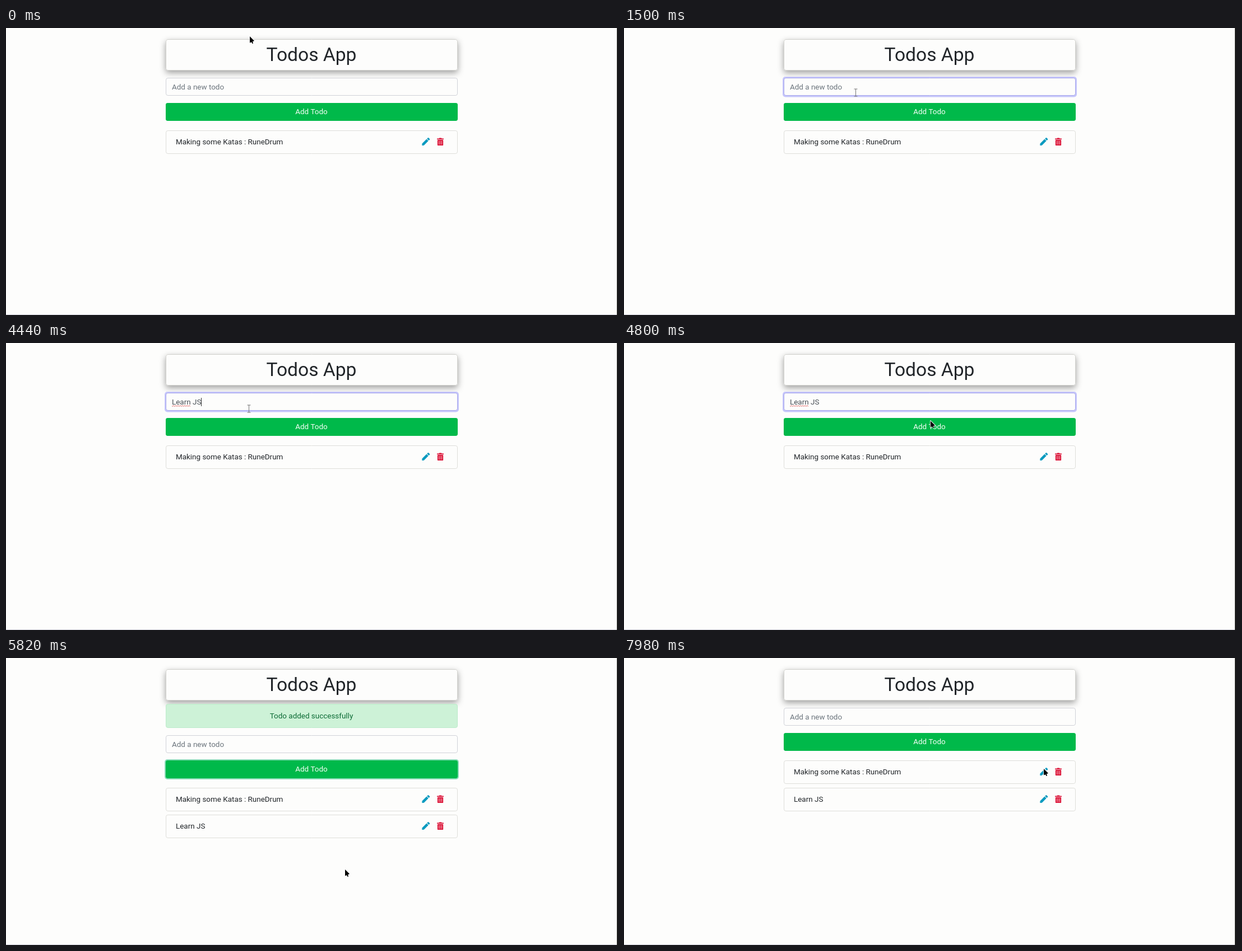
These frames come from a looping animation (1092x513 px, 8 s). An HTML page with a canvas:

```html
<!DOCTYPE html>
<html lang="en">
<head>
<meta charset="utf-8">
<title>Todos App</title>
<style>
  html, body { margin: 0; width: 100%; height: 100%; overflow: hidden; background: #fdfdfc; }
  canvas { display: block; width: 1092px; height: 513px; }
</style>
</head>
<body>
<canvas id="stage" width="1092" height="513"></canvas>
<script>
const ctx = document.getElementById('stage').getContext('2d');
const LOOP = 8000;
const LEFT = 285, WIDTH = 521, CENTER = 545, RADIUS = 3.4;
const PITCH = 48.7;
const PAPER = '#fdfdfc';
const FONT = 'Roboto, Arial, sans-serif';

const FOCUS = 1000, HOVER = 4790, BLUR = 4980, ADDED = 5280, ALERT_END = 6300;
const DRAFT = 'Learn JS', FIRST_WORD = 6;

// The pointer rests between these moves
const MOVES = [
  { from: 100, to: 180, x: 431, y: 20 },
  { from: 480, to: 960, x: 413.5, y: 115 },
  { from: 4430, to: 4440, x: 433.5, y: 117 },
  { from: 4560, to: 4960, x: 607.5, y: 151 },
  { from: 5340, to: 5820, x: 605, y: 378 },
  { from: 6180, to: 6780, x: 515.5, y: 382.5 },
  { from: 7020, to: 7440, x: 728, y: 238 },
  { from: 7680, to: 7960, x: 749, y: 198 }
];

const lerp = (a, b, k) => a + (b - a) * k;
const ease = v => v * v * (3 - 2 * v);
const ramp = (t, from, to = from + 150) =>
  ease(Math.max(0, Math.min(1, (t - from) / (to - from))));
const mix = (a, b, k) => `rgb(${a.map((v, i) => Math.round(lerp(v, b[i], k)))})`;

function pointerAt(t) {
  let x = 435, y = 15;
  for (const move of MOVES) {
    const k = ramp(t, move.from, move.to);
    x = lerp(x, move.x, k);
    y = lerp(y, move.y, k);
  }
  return { x, y };
}

// Steady typing, with a pause before the second word
const keyTime = i => i < FIRST_WORD ? 1800 + i * 264 : 3900 + (i - FIRST_WORD) * 120;

function typedCount(t) {
  let n = 0;
  while (n < DRAFT.length && keyTime(n) <= t) n++;
  return n;
}

function box(x, y, w, h, fill, stroke, r = RADIUS) {
  ctx.beginPath();
  ctx.roundRect(x, y, w, h, r);
  if (fill) { ctx.fillStyle = fill; ctx.fill(); }
  if (stroke) { ctx.strokeStyle = stroke; ctx.lineWidth = 1; ctx.stroke(); }
}

function frame(y, h, fill, stroke) {
  box(LEFT + .5, Math.round(y) + .5, WIDTH - 1, h, fill, stroke);
}

function halo(y, h, color, amount) {
  ctx.globalAlpha = amount;
  box(LEFT - 2, y - 2, WIDTH + 4, h + 4, color, null, 5);
  ctx.globalAlpha = 1;
}

function label(text, x, y, color, align = 'left', size = 13.44) {
  ctx.font = `${size}px ${FONT}`;
  ctx.textAlign = align;
  ctx.fillStyle = color;
  ctx.fillText(text, x, Math.round(y));
}

function header() {
  ctx.save();
  ctx.shadowColor = 'rgba(0,0,0,.38)';
  ctx.shadowBlur = 12;
  ctx.shadowOffsetY = 4.5;
  box(LEFT, 20, WIDTH, 55.5, PAPER);
  ctx.restore();
  frame(20, 55, PAPER, '#d2d2ce');
  label('Todos App', CENTER, 59, '#212529', 'center', 33.6);
}

function alertBar() {
  frame(82, 42, '#cdf2d7', '#bcebca');
  label('Todo added successfully', CENTER, 108, '#0c6b35', 'center');
}

function squiggle(x, y, w) {
  ctx.beginPath();
  for (let i = 0; i <= w; i++) ctx.lineTo(x + i, y + Math.sin(i * Math.PI / 2) * .8);
  ctx.strokeStyle = '#e06a6a';
  ctx.lineWidth = 1;
  ctx.stroke();
}

function caretOn(t, count) {
  const last = count ? keyTime(count - 1) : FOCUS;
  return t >= FOCUS && t < BLUR && (t - last) % 1000 < 500;
}

function input(t, dy) {
  const focus = ramp(t, FOCUS) * (1 - ramp(t, BLUR));
  const count = t < ADDED ? typedCount(t) : 0;
  const typed = DRAFT.slice(0, count);
  const y = 89 + dy;
  halo(y, 32.5, '#c6c6fb', focus);
  frame(y, 31, PAPER, mix([208, 210, 216], [166, 166, 235], focus));
  label(typed || 'Add a new todo', 296, 110 + dy, typed ? '#495057' : '#6c757d');
  if (count >= FIRST_WORD && t < BLUR) squiggle(296, 112.5, ctx.measureText('Learn').width);
  if (caretOn(t, count)) {
    ctx.fillStyle = '#333';
    ctx.fillRect(Math.round(296 + ctx.measureText(typed).width), 98, 1, 15);
  }
}

function button(t, dy) {
  const hover = ramp(t, HOVER) * (1 - ramp(t, ADDED));
  const y = Math.round(134 + dy);
  halo(y, 32, '#8bdcb9', ramp(t, 5060) * (1 - ramp(t, ALERT_END)));
  box(LEFT, y, WIDTH, 32, mix([0, 185, 74], [0, 150, 57], hover));
  label('Add Todo', CENTER, 154.4 + dy, '#f4fff7', 'center');
}

// Drawn along its length from the tip, then turned
function pencil(x, y) {
  const half = 2.3;
  ctx.save();
  ctx.translate(x, y);
  ctx.rotate(-Math.PI / 4);
  ctx.fillStyle = '#0a9abf';
  ctx.beginPath();
  ctx.lineTo(0, 0);
  ctx.lineTo(half, -half);
  ctx.lineTo(half, half);
  ctx.fill();
  ctx.fillRect(half, -half, 11.5, half * 2);
  box(14.8, -half, 3.2, half * 2, '#0a9abf', null, .8);
  ctx.restore();
}

function trash(x, y) {
  const red = '#dc1438';
  box(x + 3.6, y - .2, 4.8, 1.6, red, null, .7);
  box(x, y + .8, 12, 1.7, red, null, .5);
  box(x + .9, y + 3.3, 10.2, 10, red, null, 1.2);
  ctx.fillStyle = '#f6d3d8';
  for (let i = 0; i < 3; i++) ctx.fillRect(x + 3.1 + i * 2.5, y + 5, .8, 6.5);
}

function todo(text, y) {
  frame(y, 41, PAPER, '#dededa');
  label(text, 303, y + 25, '#212529');
  pencil(742.3, Math.round(y) + 27);
  trash(769, Math.round(y) + 13.8);
}

function arrow(x, y) {
  ctx.save();
  ctx.translate(x, y);
  const head = new Path2D('M0 0V11.4L8 8Z');
  const tail = new Path2D('M3.2 8L5.3 12.6');
  ctx.lineJoin = 'round';
  ctx.strokeStyle = '#fff';
  ctx.lineWidth = 1.6;
  ctx.stroke(head);
  ctx.lineWidth = 3.6;
  ctx.stroke(tail);
  ctx.strokeStyle = '#000';
  ctx.lineWidth = 2;
  ctx.stroke(tail);
  ctx.fill(head);
  ctx.restore();
}

function textBeam(x, y) {
  ctx.fillStyle = '#777';
  ctx.fillRect(x - .5, y - 6, 1, 13);
  for (const end of [-6.5, 6.5]) ctx.fillRect(x - 3, y + end, 6, 1);
}

function draw(t) {
  const alerted = t >= ADDED && t < ALERT_END;
  const dy = alerted ? PITCH : 0;

  ctx.fillStyle = PAPER;
  ctx.fillRect(0, 0, 1092, 513);
  header();
  if (alerted) alertBar();
  input(t, dy);
  button(t, dy);
  todo('Making some Katas : RuneDrum', 183 + dy);
  if (t >= ADDED) todo(DRAFT, 183 + PITCH + dy);

  ctx.fillStyle = '#cfcfd8';
  ctx.fillRect(0, 512, 1092, 1);
  ctx.fillStyle = '#1c1c1c';
  ctx.fillRect(1090, 0, 2, 513);

  const { x, y } = pointerAt(t);
  const inField = y > 89 + dy && y < 121 + dy;
  ctx.fillStyle = '#000';
  (inField ? textBeam : arrow)(x, y);
}

const start = performance.now();
function tick() {
  draw((performance.now() - start) % LOOP);
  requestAnimationFrame(tick);
}
tick();
</script>
</body>
</html>
```
